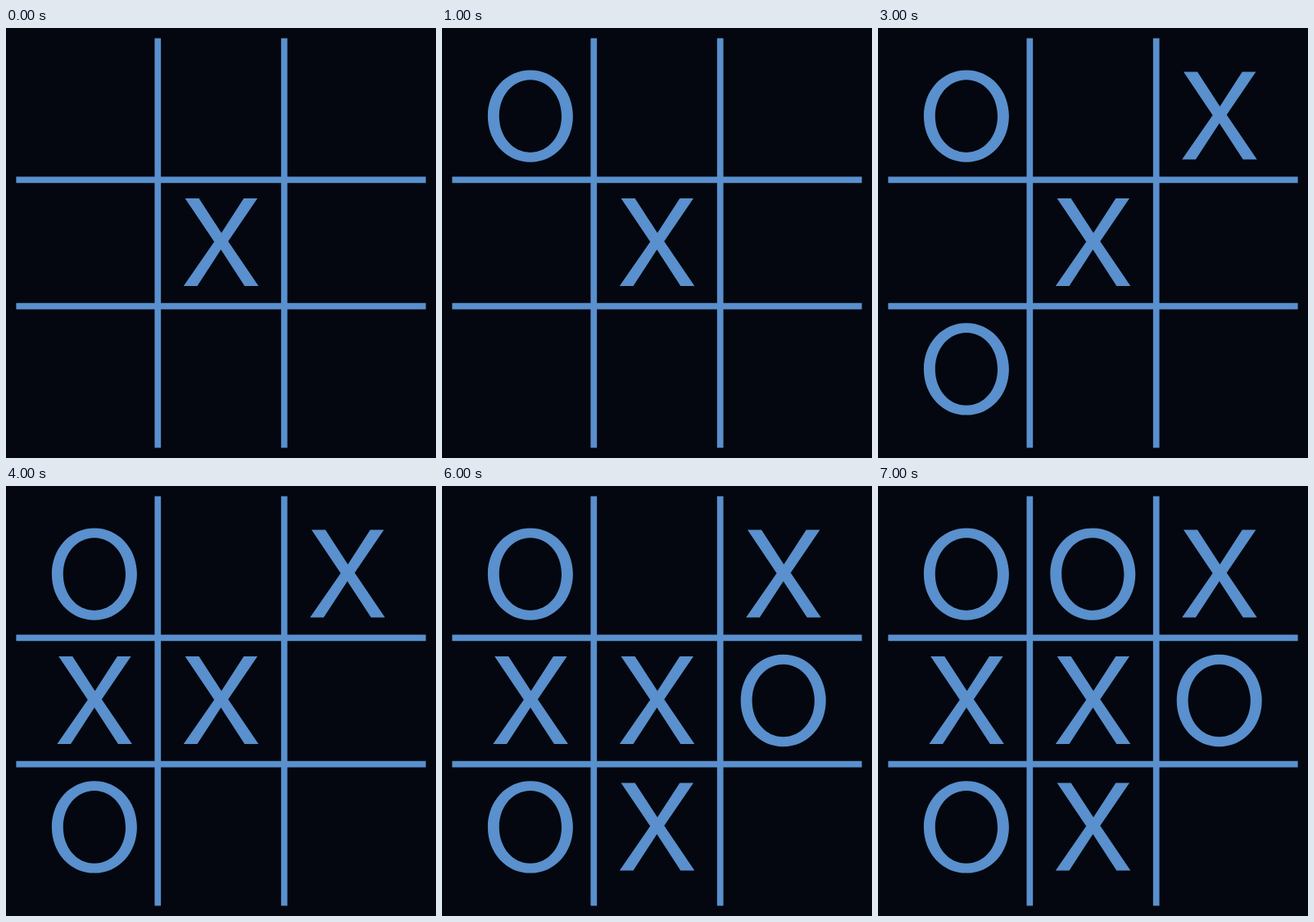
Write an HTML page that moves like this. It is 525 by 525 pixels and loops after 8 s.

```html
<!DOCTYPE html>
<html lang="en">
<head>
<meta charset="utf-8">
<title>Noughts and crosses</title>
<style>
html, body { margin: 0; width: 100%; height: 100%; overflow: hidden; background: #04070f; }
svg { display: block; width: 100vw; height: 100vh; }
</style>
</head>
<body>
<svg id="board" viewBox="0 0 525 525">
  <rect width="525" height="525" fill="#04070f"/>
  <path d="M185.3 12.4V512.6M339.7 12.4V512.6M12.4 185.3H512.6M12.4 339.7H512.6"
        stroke="#5990cd" stroke-width="7.7" fill="none"/>
</svg>
<script>
const PITCH = 154.4, STEP = 1000, LOOP = 8000;

// Each move: mark, column and row relative to the centre cell
const moves = [
  ["X", 0, 0], ["O", -1, -1], ["X", 1, -1], ["O", -1, 1],
  ["X", -1, 0], ["O", 1, 0], ["X", 0, 1], ["O", 0, -1]
];

function oval(cx, cy, rx, ry) {
  const k = 0.565, a = rx * k, b = ry * k;
  return `M${cx} ${cy - ry}` +
    `c${a} 0 ${rx} ${ry - b} ${rx} ${ry}` +
    `c0 ${b} ${a - rx} ${ry} ${-rx} ${ry}` +
    `c${-a} 0 ${-rx} ${b - ry} ${-rx} ${-ry}` +
    `c0 ${-b} ${rx - a} ${-ry} ${rx} ${-ry}z`;
}

const shapes = {
  X: "M218.6 208H235.6L263 250.2L290.3 208H307L271.3 260.4L308.3 315H291.3" +
     "L262.4 270.6L233.5 315H216.8L254.2 260.9z",
  O: oval(262.3, 262, 52, 56.2) + oval(262.3, 262, 38.1, 44.3)
};

const board = document.getElementById("board");
const marks = moves.map(([mark, col, row]) => {
  const p = document.createElementNS("http://www.w3.org/2000/svg", "path");
  p.setAttribute("d", shapes[mark]);
  p.setAttribute("fill", "#5990cd");
  p.setAttribute("fill-rule", "evenodd");
  p.setAttribute("transform", `translate(${col * PITCH} ${row * PITCH})`);
  return board.appendChild(p);
});

function draw(t) {
  const turn = Math.floor((t % LOOP) / STEP);
  marks.forEach((m, i) => m.setAttribute("visibility", i <= turn ? "visible" : "hidden"));
}

const start = performance.now();
function tick() {
  draw(performance.now() - start);
  requestAnimationFrame(tick);
}
tick();
</script>
</body>
</html>
```
